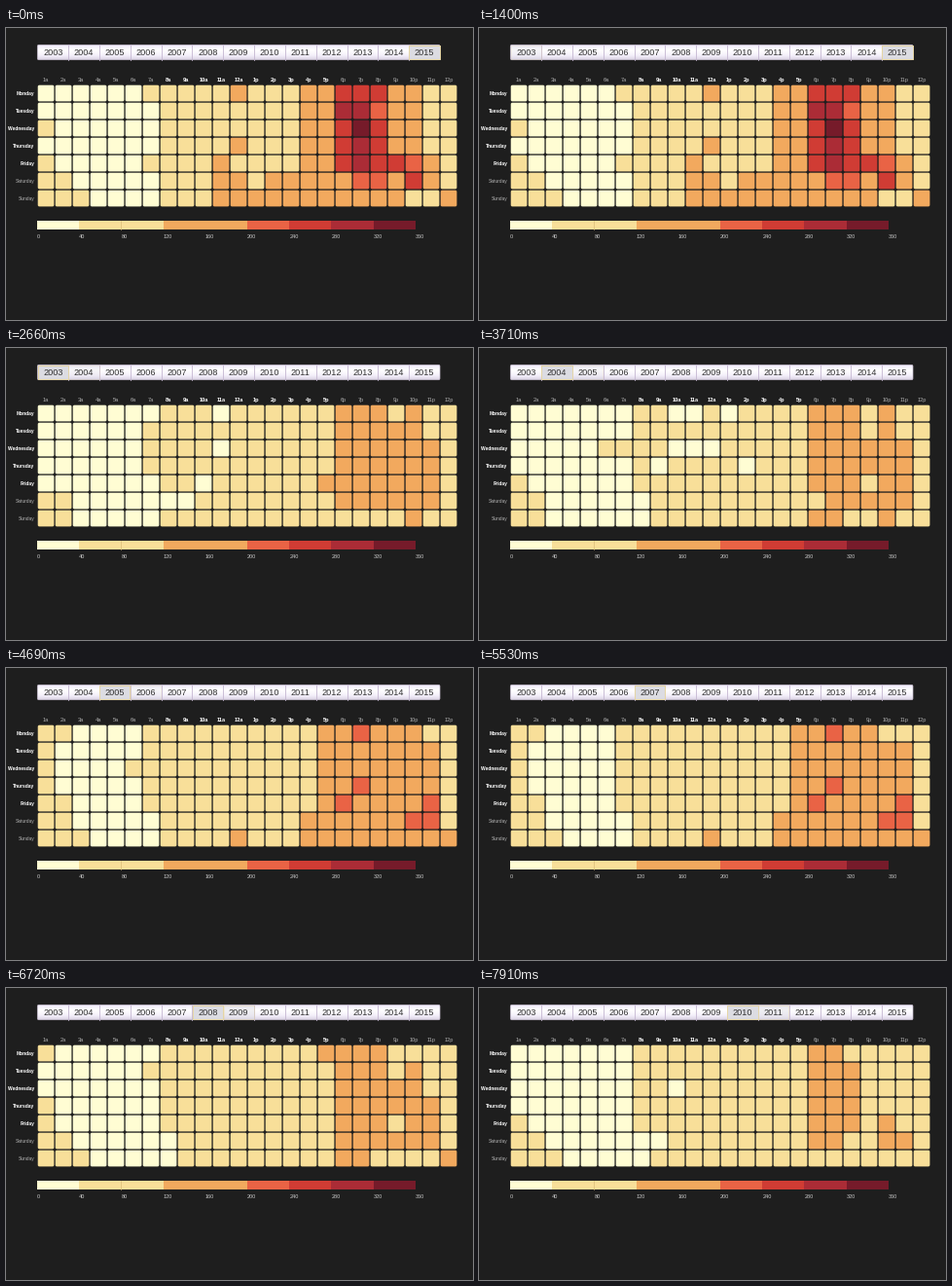
A matplotlib script for the animation above (8000 ms loop, 480 px wide and 300 px high).

```python
import numpy as np
import matplotlib.pyplot as plt
from matplotlib.animation import FuncAnimation
from matplotlib.collections import PatchCollection
from matplotlib.colors import to_rgb
from matplotlib.patches import FancyBboxPatch, Rectangle

DPI, WIDTH, HEIGHT = 100, 480, 300
LOOP, INTERVAL, TICK = 8000, 40, 70
BACKGROUND = "#1e1e1e"
LEVELS = np.array([to_rgb(c) for c in (
    "#fffdd3", "#f8df99", "#f2a95e", "#e96345", "#d03c34", "#ab2c36", "#761b2a")])
DAYS = ["Monday", "Tuesday", "Wednesday", "Thursday", "Friday", "Saturday", "Sunday"]
DAY_KEYS = "MTWRFSU"
YEARS = range(2003, 2016)
BAR_LEFT, BAR_RIGHT, BAR_TOP, BAR_BOTTOM = 32.3, 446, 17.3, 32.7
BUTTON = (BAR_RIGHT - BAR_LEFT) / len(YEARS)
PITCH, CELL = 18, 16.7


def week(nights, mornings, *spots):
    """Quiet hours between night and morning; spots are (days, first, last, level)."""
    grid = np.ones((7, 24), int)
    for row, (night, morning) in enumerate(zip(nights, mornings)):
        grid[row, night:morning - 1] = 0
    for days, first, last, level in spots:
        for day in days:
            grid[DAY_KEYS.index(day), first - 1:last] = level
    return grid


w2015 = week(
    [0, 0, 1, 0, 1, 2, 3], [7, 8, 8, 8, 7, 8, 8],
    ("MTWRF", 16, 22, 2), ("MR", 12, 12, 2), ("F", 11, 11, 2),
    ("MWRF", 18, 20, 4), ("T", 18, 19, 5), ("T", 20, 20, 3),
    ("W", 19, 19, 6), ("RF", 19, 19, 5),
    ("F", 21, 21, 4), ("F", 22, 22, 3), ("F", 23, 23, 2),
    ("S", 11, 12, 2), ("S", 14, 23, 2), ("S", 19, 20, 3), ("S", 22, 22, 4),
    ("U", 11, 21, 2), ("U", 24, 24, 2))
w2003 = week(
    [0, 0, 0, 0, 0, 2, 2], [8, 7, 7, 7, 8, 10, 8],
    ("MW", 11, 11, 0), ("F", 10, 10, 0), ("MT", 18, 22, 2), ("M", 21, 21, 1),
    ("WRFS", 18, 23, 2), ("F", 17, 17, 2), ("U", 22, 22, 2))
w2004 = week(
    [0, 0, 0, 0, 1, 2, 2], [8, 8, 6, 8, 8, 9, 9],
    ("M", 10, 11, 0), ("M", 13, 13, 0), ("W", 10, 12, 0), ("R", 9, 9, 0),
    ("R", 14, 14, 0), ("MT", 18, 22, 2), ("WRF", 18, 23, 2), ("MTF", 21, 21, 1),
    ("S", 19, 23, 2), ("U", 18, 19, 2), ("U", 22, 22, 2))
w2006 = week(
    [2, 1, 1, 1, 2, 2, 3], [7, 7, 7, 7, 7, 8, 8],
    ("M", 17, 21, 2), ("TWRF", 17, 23, 2), ("MR", 19, 19, 3), ("F", 18, 18, 3),
    ("F", 23, 23, 3), ("S", 16, 21, 2), ("S", 22, 23, 3),
    ("U", 12, 12, 2), ("U", 16, 24, 2))
w2008 = week(
    [1, 0, 0, 1, 1, 2, 3], [8, 7, 8, 8, 8, 9, 9],
    ("M", 17, 20, 2), ("TW", 18, 22, 2), ("RFS", 18, 23, 2), ("TF", 21, 21, 1),
    ("U", 18, 19, 2), ("U", 24, 24, 2))
w2010 = week(
    [0, 0, 0, 0, 1, 2, 3], [8, 8, 8, 8, 8, 10, 9],
    ("W", 10, 10, 0), ("MTWRFS", 18, 19, 2), ("TWRF", 20, 20, 2),
    ("FS", 22, 22, 2), ("S", 23, 23, 2))
w2005 = (w2004 + w2006 + 1) // 2
w2007 = (w2006 + w2008) // 2
w2009 = np.where(np.arange(24) % 7 == 0, w2008, w2010)

# start and end of each colour fade, and the week it leads to
FADES = [(1960, 2380, w2003), (3150, 3500, w2004), (4060, 4410, w2005),
         (4970, 5320, w2006), (5670, 5950, w2007), (6370, 6720, w2008),
         (7070, 7420, w2009), (7770, 7910, w2010)]

# year, hover start, press start, release start
PRESSES = [(2015, -900, -900, 1750), (2003, 1330, 1750, 2940),
           (2004, 2590, 2800, 3920), (2005, 3640, 3850, 4760),
           (2006, 4620, 4760, 5390), (2007, 5250, 5390, 6090),
           (2008, 5880, 6090, 6790), (2009, 6580, 6790, 7490),
           (2010, 7280, 7490, 9000), (2011, 7770, 9000, 9000)]


def ramp(t, start, length):
    return min(max((t - start) / length, 0), 1)


def ease(u):
    return 4 * u ** 3 if u < 0.5 else 1 - (2 - 2 * u) ** 3 / 2


def cell_colors(t):
    colors = LEVELS[w2015.ravel()]
    for start, end, grid in FADES:
        u = ease(ramp(t, start, end - start))
        colors = colors * (1 - u) + LEVELS[grid.ravel()] * u
    return colors


def button_shades(t):
    shades = np.zeros(len(YEARS))
    for year, hover, press, release in PRESSES:
        on = 0.65 * ramp(t, hover, 210) + 0.35 * ramp(t, press, 140)
        shades[year - YEARS[0]] = on * (1 - ramp(t, release, 140))
    return shades


fig = plt.figure(figsize=(WIDTH / DPI, HEIGHT / DPI), dpi=DPI, facecolor=BACKGROUND)
ax = fig.add_axes([0, 0, 1, 1])
ax.axis("off")


def label(x, y, text, px, color, **style):
    ax.text(x, y, text, fontsize=px * 72 / DPI, color=color,
            family="Liberation Sans", va="baseline", **style)


# year bar: soft vertical gradient with a shading overlay per button
stops = [to_rgb(c) for c in ("#f0eafa", "#ffffff", "#f4f0fa", "#dcd4e6")]
gradient = np.array([[np.interp(y, [0, 0.35, 0.7, 1], channel) for channel in zip(*stops)]
                     for y in np.linspace(0, 1, 32)])[:, None, :]
bar = ax.imshow(gradient, extent=(BAR_LEFT, BAR_RIGHT, BAR_BOTTOM, BAR_TOP), aspect="auto")
outline = FancyBboxPatch((BAR_LEFT, BAR_TOP), BAR_RIGHT - BAR_LEFT, BAR_BOTTOM - BAR_TOP,
                         boxstyle="round,pad=0,rounding_size=1.5", fc="none",
                         ec="#c9c0d2", lw=0.5)
ax.add_patch(outline)
bar.set_clip_path(outline)

lefts = BAR_LEFT + BUTTON * np.arange(len(YEARS))
for x in lefts[1:]:
    ax.plot([x, x], [BAR_TOP, BAR_BOTTOM], color="#c4b6d0", lw=0.6)
overlay = PatchCollection(
    [Rectangle((x + 0.3, BAR_TOP + 0.3), BUTTON - 0.6, BAR_BOTTOM - BAR_TOP - 0.6)
     for x in lefts], linewidths=0.7, zorder=3)
ax.add_collection(overlay)
for x, year in zip(lefts, YEARS):
    label(x + BUTTON / 2, 28.2, str(year), 9.2, "#333333", ha="center", zorder=4)

# heat map
cells = PatchCollection(
    [FancyBboxPatch((32.7 + PITCH * col, 58.7 + PITCH * row), CELL, CELL,
                    boxstyle="round,pad=0,rounding_size=1.6")
     for row in range(7) for col in range(24)], linewidths=0)
ax.add_collection(cells)

for row, day in enumerate(DAYS):
    workday = row < 5
    label(29.5, 69.3 + PITCH * row, day, 4.9, "white" if workday else "#b0b0b0",
          ha="right", weight="bold" if workday else "normal")
for col in range(24):
    busy = 7 <= col <= 16
    label(41 + PITCH * col, 55.2, f"{col % 12 + 1}{'a' if col < 12 else 'p'}", 5.6,
          "white" if busy else "#b0b0b0", ha="center",
          weight="bold" if busy else "normal")

# legend
SWATCH = 43.2
for i, level in enumerate([0, 1, 1, 2, 2, 3, 4, 5, 6]):
    ax.add_patch(Rectangle((32 + SWATCH * i, 198), SWATCH, 9, fc=LEVELS[level], lw=0))
ax.plot([118.4, 118.4], [198, 207], color="#d9bd78", lw=0.5)
for i in range(10):
    label(32 + SWATCH * i, 216.2, str(40 * i), 5.5, "#c8c8c8", ha="left")

ax.set_xlim(0, WIDTH)
ax.set_ylim(HEIGHT, 0)


def update(frame):
    t = (frame * INTERVAL + 30) // TICK * TICK
    cells.set_facecolor(cell_colors(t))
    shades = button_shades(t)
    overlay.set_facecolor([(*to_rgb("#dcdce2"), s) for s in shades])
    overlay.set_edgecolor([(*to_rgb("#e6d6a4"), s) for s in shades])
    return cells, overlay


anim = FuncAnimation(fig, update, frames=LOOP // INTERVAL, interval=INTERVAL,
                     repeat=True, repeat_delay=0)
plt.show()
```
